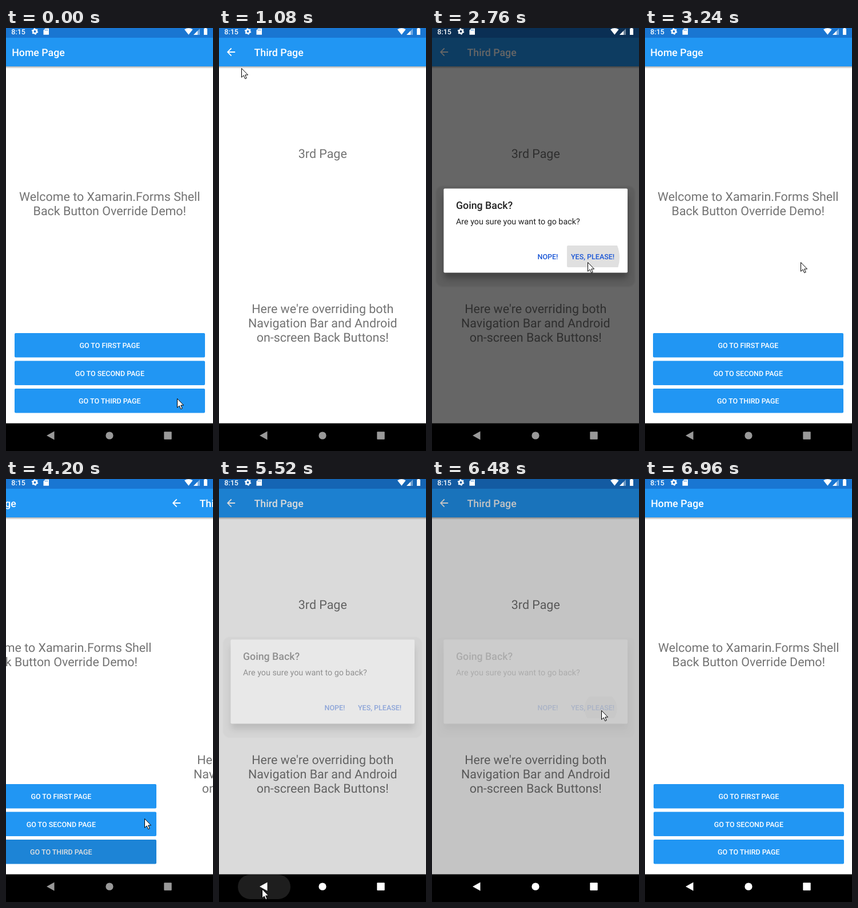
An HTML page for the animation above (7200 ms loop, 362 px wide and 739 px high).

```html
<!DOCTYPE html>
<html lang="en">
<head>
<meta charset="utf-8">
<title>Back button override</title>
<style>
  html, body { margin: 0; width: 100%; height: 100%; overflow: hidden; background: #000; }
  svg { display: block; font-family: Roboto, sans-serif; text-rendering: geometricPrecision; cursor: default; }
  .title { font-size: 17.75px; font-weight: 500; }
  .label { font-size: 21.43px; fill: #737373; text-anchor: middle; }
  .btn { font-size: 12.5px; font-weight: 500; fill: #fff; text-anchor: middle; }
  .act { font-size: 12.5px; font-weight: 500; fill: #1a56d6; }
</style>
</head>
<body>
<svg width="362" height="739" viewBox="0 0 362 739">
  <defs>
    <linearGradient id="drop" x2="0" y2="1">
      <stop offset="0" stop-opacity=".32"/>
      <stop offset="1" stop-opacity="0"/>
    </linearGradient>
    <filter id="blur" x="-20%" y="-30%" width="140%" height="160%"><feGaussianBlur stdDeviation="6"/></filter>
    <filter id="soft" x="-10%" y="-10%" width="120%" height="120%"><feGaussianBlur stdDeviation="1"/></filter>
    <clipPath id="btnClip"><rect x="15" y="630" width="333" height="42.5" rx="2"/></clipPath>
    <clipPath id="yesClip"><rect x="236" y="380" width="92" height="38" rx="2"/></clipPath>
    <clipPath id="navClip"><rect x="33" y="691" width="92" height="43" rx="21.5"/></clipPath>
  </defs>

  <g id="pages"></g>

  <rect width="362" height="17" fill="#1976d2"/>
  <rect id="dim" width="362" height="691"/>

  <g fill="#fff">
    <text x="9.3" y="11" font-size="12.5" font-weight="500">8:15</text>
    <circle cx="50.5" cy="6" r="3.2" fill="none" stroke="#fff" stroke-width="2.6"/>
    <circle cx="50.5" cy="6" r="4.9" fill="none" stroke="#fff" stroke-width="1.6" stroke-dasharray="2.56"/>
    <path d="M68.5 .8H75V11.8H65.5V4Z"/>
    <path d="M68.4 2.6v2M70.4 2.6v2M72.4 2.6v2" stroke="#1976d2" stroke-width=".9"/>
    <path d="M312 2.6Q319.3 -2 326.6 2.6L319.3 11.8Z"/>
    <path d="M339 1V12H328Z" opacity=".4"/>
    <path d="M335 5V12H328Z"/>
    <path d="M347.4 1V0H350.6V1H352V12H346V1Z"/>
  </g>

  <g id="dialog">
    <rect x="7" y="276" width="348" height="176" rx="12" opacity=".07" filter="url(#soft)"/>
    <rect x="21" y="293" width="321" height="144" rx="4" opacity=".3" filter="url(#blur)"/>
    <rect x="20.4" y="280.4" width="321.6" height="147" rx="2" fill="#fff"/>
    <g clip-path="url(#yesClip)"><circle id="yes" cy="401" opacity=".12"/></g>
    <text class="title" x="42" y="316" fill="#212121">Going Back?</text>
    <text x="42" y="343" font-size="14.3" fill="#212121">Are you sure you want to go back?</text>
    <text class="act" x="184.5" y="404">NOPE!</text>
    <text class="act" x="243" y="404">YES, PLEASE!</text>
  </g>

  <rect y="690.6" width="362" height="49"/>
  <g clip-path="url(#navClip)"><circle id="navTap" cx="79" cy="712" fill="#1e1e1e"/></g>
  <g id="nav">
    <path d="M71 712L84.5 704.5V719.5Z"/>
    <circle cx="181" cy="712" r="6.6"/>
    <rect x="276.3" y="705.3" width="13.4" height="13.4" rx="1"/>
  </g>

  <path id="cursor" d="M.5 .5V16.2L4.1 12.9L6.7 18.7L9.2 17.6L6.7 12H11.6Z" fill="#fff" stroke="#000"/>
</svg>

<script>
const $ = id => document.getElementById(id);
const LOOP = 7200, STEP = 120, W = 362;

const lines = (y, ...rows) =>
  rows.map((s, i) => `<text class="label" x="181.3" y="${y + i * 25}">${s}</text>`).join('');

const button = (s, i) => {
  const y = 533 + i * 48.5;
  return `<rect x="15" y="${y}" width="333" height="42.5" rx="2" fill="#2196f3"/>
    <text class="btn" x="181.3" y="${y + 26}">GO TO ${s} PAGE</text>`;
};

const page = (x, title, titleX, body) =>
  `<g transform="translate(${x})">
     <rect y="17" width="${W}" height="674" fill="#fff"/>
     <rect y="67" width="${W}" height="4" fill="url(#drop)"/>
     <rect y="17" width="${W}" height="50" fill="#2196f3"/>
     <text class="title" fill="#fff" x="${titleX}" y="49">${title}</text>${body}
   </g>`;

$('pages').innerHTML =
  page(0, 'Home Page', 10.2,
    lines(302, 'Welcome to Xamarin.Forms Shell', 'Back Button Override Demo!') +
    ['FIRST', 'SECOND', 'THIRD'].map(button).join('') +
    '<g clip-path="url(#btnClip)"><circle id="btnTap" cx="286" cy="651" opacity=".12"/></g>') +
  page(W, 'Third Page', 61.5,
    '<circle id="backTap" cx="21" cy="42" fill="#fff" opacity=".2"/>' +
    `<path fill="#fff" transform="translate(10.3 31.3) scale(.893)"
       d="M20 11H7.83l5.59-5.59L12 4l-8 8 8 8 1.41-1.41L7.83 13H20z"/>` +
    lines(227, '3rd Page') +
    lines(498, "Here we're overriding both", 'Navigation Bar and Android', 'on-screen Back Buttons!'));

// Each visit: open the page, go back, be asked, answer yes
const visits = [
  { open: 120, back: 1500, ask: 1490, yes: 2640, x: 272, spread: .47, via: 'backTap' },
  { open: 3840, back: 4980, ask: 5450, yes: 6240, x: 295, spread: .12, via: 'navTap' }
];

// Pointer glides: start, duration, then where it comes to rest
const glides = [
  [360, 480, 89, 168], [960, 320, 23, 39], [1500, 900, 302, 408], [2520, 120, 272, 409],
  [3360, 240, 273, 643], [4080, 480, 220, 557], [4560, 480, 75, 716], [5520, 480, 296, 404]
];

const ramp = (t, from, dur) => Math.min(1, Math.max(0, (t - from) / dur));
const slide = (t, from) => (1 - Math.cos(Math.PI * ramp(t, from, 372))) / 2;
const glide = k => 1 - (1 - k) ** 3;

const pointer = t => glides.reduce(([x, y], [from, dur, toX, toY]) => {
  const k = glide(ramp(t, from, dur));
  return [x + (toX - x) * k, y + (toY - y) * k];
}, [299, 647]).map(Math.round);

const set = (id, name, value) => $(id).setAttribute(name, value);
const ripple = (id, t, start, speed, max) =>
  set(id, 'r', Math.min(max, Math.max(0, (t - start) * speed)));

function draw(t) {
  const v = visits[t < visits[1].open ? 0 : 1];
  const fade = (inDur, outDur) => ramp(t, v.ask, inDur) - ramp(t, v.yes + 120, outDur);

  const at = slide(t, v.open + 240) - slide(t, v.yes + 240);
  set('pages', 'transform', `translate(${Math.round(-W * at)})`);
  set('dim', 'opacity', .6 * fade(290, 195));
  set('dialog', 'opacity', fade(175, 141));

  ripple('btnTap', t, v.open - 60, t < v.open + 720 ? .8 : 0, 300);
  for (const { via, back } of visits) ripple(via, t, back, t < back + 780 ? .25 : 0, via === 'navTap' ? 52 : 20);
  set('navTap', 'opacity', 1 - ramp(t, 5520, 240));
  set('yes', 'cx', v.x);
  ripple('yes', t, v.yes, v.spread, 56);

  set('nav', 'fill', t < visits[1].back ? '#999' : '#fff');
  set('cursor', 'transform', `translate(${pointer(t)})`);
  set('cursor', 'visibility', t < 6960 ? 'visible' : 'hidden');
}

const start = performance.now();
function tick() {
  const t = (performance.now() - start) % LOOP;
  draw(Math.floor(t / STEP) * STEP);
  requestAnimationFrame(tick);
}
tick();
</script>
</body>
</html>
```
